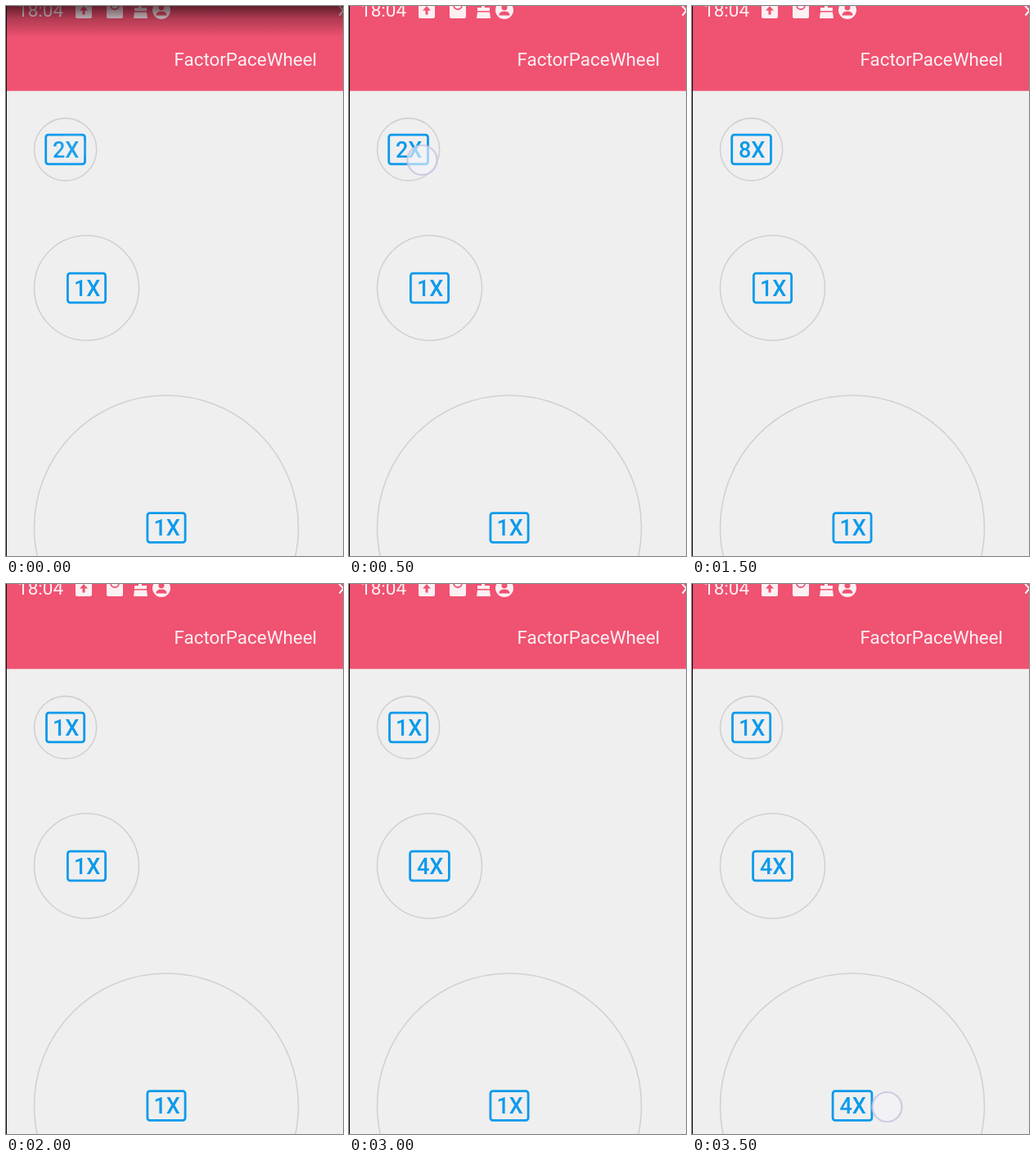
Animation of 412 by 671 pixels, one loop 4000 ms. Source, as an HTML page:

```html
<!DOCTYPE html>
<html lang="en">
<head>
<meta charset="utf-8">
<title>Speed labels</title>
<style>
  html, body { margin: 0; width: 100%; height: 100%; overflow: hidden; background: #efefef; }
  svg { display: block; width: 412px; height: 671px; }
  text { font-family: Roboto, sans-serif; }
  .ring { fill: none; stroke: #d1d1d1; stroke-width: 1.6; }
  .label rect { fill: none; stroke: #0c9aeb; stroke-width: 2.8; }
  .label text { fill: #0c9aeb; font-size: 27px; font-weight: 500; text-anchor: middle; }
  .light { fill: #fdf0f3; }
  .pink { fill: #f05271; }
</style>
</head>
<body>
<svg viewBox="0 0 412 671">
  <defs>
    <linearGradient id="dim" x1="0" y1="0" x2="0" y2="1">
      <stop offset="0" stop-color="#180208" stop-opacity=".66"/>
      <stop offset=".4" stop-color="#180208" stop-opacity=".3"/>
      <stop offset="1" stop-color="#180208" stop-opacity="0"/>
    </linearGradient>
  </defs>
  <rect width="412" height="671" fill="#efefef"/>
  <rect class="pink" width="412" height="103.6"/>

  <g class="light">
    <text x="14" y="13" font-size="22.5">18:04</text>
    <rect x="85" y="-4" width="20" height="19" rx="2"/>
    <rect x="123" y="-4" width="20" height="19" rx="2"/>
    <path d="M162 -2h4v4h6v4h-15v-4h5zM157 7.5h15l1 7.5h-17z"/>
    <circle cx="190" cy="5" r="11"/>
    <text x="205.5" y="73" font-size="22.4">FactorPaceWheel</text>
  </g>
  <path class="pink" d="M95 0l5 5.500h-3.500v5h-3v-5h-3.500z"/>
  <path d="M128 -1a5 5 0 0 0 10 0" fill="none" stroke="#f05271" stroke-width="1.8"/>
  <g class="pink">
    <circle cx="190" cy="1.800" r="3.500"/>
    <path d="M183.500 11.500q0 -5 6.500 -5t6.500 5z"/>
  </g>
  <path d="M407 -.5l5.500 6-5 6" fill="none" stroke="#fdf0f3" stroke-width="2"/>
  <rect id="shade" width="412" height="38" fill="url(#dim)"/>

  <circle class="ring" cx="72.600" cy="175" r="38.100"/>
  <circle class="ring" cx="98.500" cy="344" r="64"/>
  <circle class="ring" cx="196" cy="636.500" r="161.500"/>
  <g id="labels"></g>
  <circle id="touch" r="18" fill="#f4f4fa" fill-opacity=".62" stroke="#c8c5e2" stroke-opacity=".85" stroke-width="2.200"/>
  <rect width="1" height="671" fill="#0c0c0c"/>
</svg>
<script>
  const NS = "http://www.w3.org/2000/svg";
  const LOOP = 4000, STEP = 500;
  const shade = document.getElementById("shade");
  const touch = document.getElementById("touch");

  // speeds of the three labels, then touch x, y and opacity
  const states = [
    { speeds: [2, 1, 1], tap: [80, 173, .14] },
    { speeds: [2, 1, 1], tap: [89.5, 188, 1] },
    { speeds: [4, 1, 1], tap: [88.5, 171, 1] },
    { speeds: [8, 1, 1] },
    { speeds: [1, 1, 1] },
    { speeds: [1, 2, 1], tap: [125, 330, 1] },
    { speeds: [1, 4, 1] },
    { speeds: [1, 4, 4], tap: [238.5, 638, 1] }
  ];

  function add(parent, tag, attrs) {
    const el = document.createElementNS(NS, tag);
    for (const key in attrs) el.setAttribute(key, attrs[key]);
    return parent.appendChild(el);
  }

  function makeLabel(cx, cy) {
    const g = add(document.getElementById("labels"), "g", { class: "label" });
    const box = add(g, "rect", { y: cy - 17.8, height: 35.6, rx: 3 });
    const text = add(g, "text", { x: cx + .6, y: cy + 9.8 });
    return speed => {
      const width = speed === 1 ? 46.2 : 47.8;
      box.setAttribute("x", cx - width / 2);
      box.setAttribute("width", width);
      text.textContent = speed + "X";
    };
  }

  const setters = [makeLabel(72.6, 175), makeLabel(98.5, 344), makeLabel(196, 636.5)];
  let shown = -1;

  function draw(time) {
    const i = Math.floor((time % LOOP) / STEP);
    if (i === shown) return;
    shown = i;
    const { speeds, tap = [0, 0, 0] } = states[i];
    setters.forEach((set, n) => set(speeds[n]));
    touch.setAttribute("cx", tap[0]);
    touch.setAttribute("cy", tap[1]);
    touch.setAttribute("opacity", tap[2]);
    shade.setAttribute("opacity", i === 0 ? 1 : 0);
  }

  const start = performance.now();
  function tick() {
    draw(performance.now() - start);
    requestAnimationFrame(tick);
  }
  tick();
</script>
</body>
</html>
```
